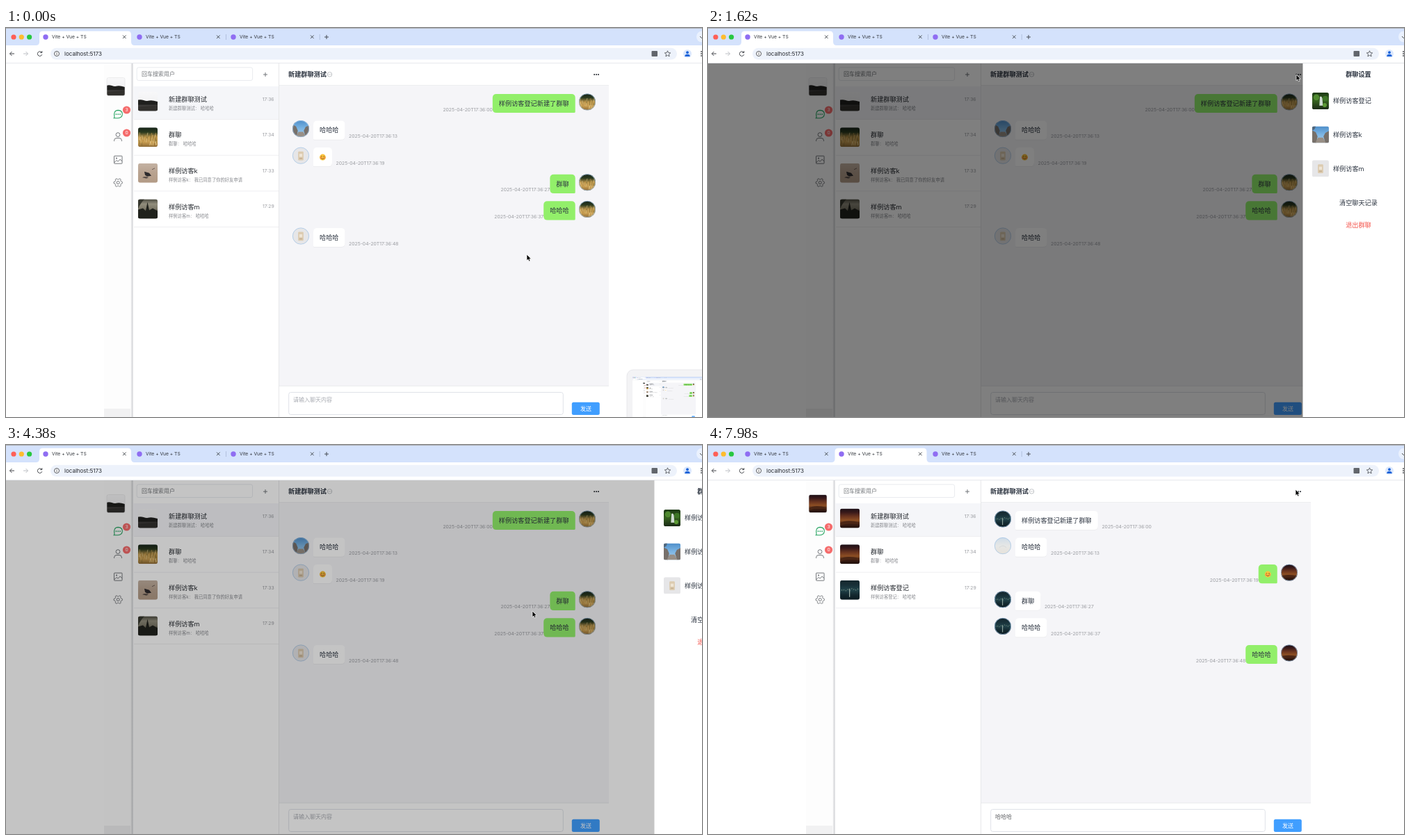
Write an HTML page that moves like this. It is 1001x560 px and loops after 8000 ms.

```html
<!DOCTYPE html>
<html lang="zh-CN">
<head>
<meta charset="utf-8">
<title>Chat</title>
<style>
html, body { margin: 0; width: 100%; height: 100%; overflow: hidden; background: #fff; }
svg { display: block; width: 100vw; height: 100vh; }
text { font-family: Inter, "Noto Sans CJK SC", "Noto Sans CJK", sans-serif; white-space: pre; }
</style>
</head>
<body>
<svg id="stage" viewBox="0 0 1001 560" xmlns="http://www.w3.org/2000/svg"></svg>
<script>
const LOOP = 8000;
const INK = '#2c3440', GREY = '#9a9ca1', GREEN = '#92ef6a', BLUE = '#409eff';
const GUEST = '样例访客登记', FRIEND = '样例访客k', PAL = '样例访客m', GROUP = '新建群聊测试';

// ---- drawing helpers; text is placed by its vertical centre
const T = (x, y, s, size, fill = INK, more = '') =>
  `<text x="${x}" y="${y + size * .37}" font-size="${size}" fill="${fill}" ${more}>${s}</text>`;
const R = (x, y, w, h, fill, more = '') =>
  `<rect x="${x}" y="${y}" width="${w}" height="${h}" fill="${fill}" ${more}/>`;
const C = (x, y, r, fill, more = '') => `<circle cx="${x}" cy="${y}" r="${r}" fill="${fill}" ${more}/>`;
const P = (d, fill, more = '') => `<path d="${d}" fill="${fill}" ${more}/>`;
const L = (d, color = '#4a4d52', w = 1, more = '') => P(d, 'none', `stroke="${color}" stroke-width="${w}" ${more}`);
const G = (id, body, more = '') => `<g id="${id}" ${more}>${body}</g>`;
const END = 'text-anchor="end"', MID = 'text-anchor="middle"';

let seed = 7;
const rnd = () => (seed = seed * 16807 % 2147483647) / 2147483647;
const many = (n, f) => Array.from({ length: n }, (_, i) => f(i)).join('');

// ---- avatars on a 28 x 28 square, each over a vertical gradient
const fade = (id, ...colors) => `<linearGradient id="${id}" x2="0" y2="1">` +
  colors.map((c, i) => `<stop offset="${i / (colors.length - 1)}" stop-color="${c}"/>`).join('') + '</linearGradient>' +
  R(0, 0, 28, 28, `url(#${id})`);

const art = {
  road: fade('fog', '#f8f8f9', '#ececee') + R(0, 15, 28, 13, '#3d3b39') +
    P('M0 12Q4 11 8 12.500T16 13T28 14.500V19H0Z', '#1f1f1d') + P('M0 28V22L28 20V28Z', '#32302d'),
  grass: fade('field0', '#16241a', '#2c3a1e', '#b9924a', '#c79c50', '#8d6a35') +
    many(46, () => {
      const x = rnd() * 28, y = 7 + rnd() * 14;
      return L(`M${x} ${y}l${rnd() * 3 - 1.5} 6`, ['#e3c27a', '#c9a04f', '#7d6a30', '#f0d9a0'][rnd() * 4 | 0], .6);
    }),
  sky: fade('noon', '#4f8fca', '#7db6e4', '#a8cdea') +
    P('M0 7L6 10L9 17L7 28H0ZM28 8L22 11L19 17L22 28H28Z', '#77706a') +
    P('M5 28L10 19H18L23 28Z', '#988f86') + P('M0 0H6L4 5L0 7Z', '#51677c'),
  bag: R(0, 0, 28, 28, '#e6e6e8') + R(9.5, 7, 9, 15, '#dccbb0', 'rx="1.5"') +
    R(11.5, 11, 5, 5, '#efe5d5') + R(11.5, 18, 5, 1.5, '#c0a98a'),
  beach: fade('sand', '#c4b2a3', '#b8a28f', '#b39b86') +
    P('M9 12l7 2 3 4-6 1-3-2z', '#2d2a2c') + P('M6 20.500q4-2.500 9 0l-3 1.500z', '#5a4e48') + L('M20 9l4-2', '#6d5d55', 1),
  castle: fade('dim', '#4b4b40', '#918d7c', '#7b7767', '#1d1f1a', '#171914') +
    P('M0 28V15L7 13L11 17L13.500 4L16 16L21 13L28 17V28Z', '#20221c') + P('M0 0H9Q3 6 0 14Z', '#35362d'),
  falls: fade('moss', '#1c3915', '#35611f', '#1b2a17') + C(7, 8, 5, '#4f8a2f') + C(22, 10, 4.5, '#3d7526') +
    P('M13 7Q16 5 17 10L18 22H12Z', '#d0ddd3') + C(21, 21, 3.500, '#5c9a35'),
  pale: fade('haze', '#cfdce8', '#e6e7e6', '#e6e2da') + L('M8 17Q14 11 20 17', '#d3d6d8'),
  dusk: fade('ember', '#1b0f16', '#3a1a1a', '#6a341f', '#8d4f24', '#3c1d12', '#1f100c') +
    P('M0 21Q9 15 28 20V23Q12 19 0 25Z', '#4b2615'),
  night: fade('bay', '#14262d', '#183038', '#21434a', '#13282f', '#0b1a20') +
    many(9, i => R(2 + i * 2.9, 11 + rnd() * 4, .8, 1.6, '#87998a')) + R(13, 12, 1.2, 12, '#9db0a8'),
};
const pic = (name, x, y, size, clip = 'square') =>
  `<g transform="translate(${x} ${y}) scale(${size / 28})"><use href="#${name}" clip-path="url(#${clip})"/>` +
  (clip === 'round' ? C(14, 14, 13.6, 'none', 'stroke="#9fc4e8" stroke-width=".8"') : '') + '</g>';

const emoji = (x, y) => C(x, y, 4.5, '#f9c23c') + C(x - 2.6, y + 1, 1.2, '#f58a4b') + C(x + 2.6, y + 1, 1.2, '#f58a4b') +
  L(`M${x - 2.7} ${y - .8}q.9-1.3 1.8 0M${x + .9} ${y - .8}q.9-1.3 1.8 0M${x - 1.9} ${y + 1.5}q1.9 2 3.8 0`, '#6b3a1c', .8);

// ---- page parts
const row = ([name, last, time, face], i) => {
  const y = 80 + i * 51.6;
  return (i ? '' : R(183.5, 84, 208.5, 47.5, '#f5f6f9')) + R(184, y + 51.2, 208, .8, '#ececee') +
    pic(face, 190, y + 11.6, 28) + T(234, y + 22.4, name, 9.17, '#22262c') +
    T(234, y + 35.4, `${name}： ${last}`, 6.3, '#85878c') + T(385.6, y + 22, time, 6.8, GREY, END);
};

const bubble = ([face, text, time, mine], i) => {
  const y = 108.5 + i * 38.6, w = 18 + (text ? text.length * 9.17 : 9);
  const x = mine ? 818.7 - w : 442, e = x + w, b = y + 13.6, t = y - 13.6;
  const [l, r] = mine ? [5.5, 1.5] : [1.5, 5.5];
  const shape = `M${x + 5.5} ${t}H${e - 5.5}q5.5 0 5.5 5.5V${b - r}q0 ${r} ${-r} ${r}H${x + l}q${-l} 0 ${-l} ${-l}V${t + 5.5}q0-5.5 5.5-5.5Z`;
  const stamp = '2025-04-20T17:36:' + time;
  return pic(face, mine ? 824 : 412, y - 14, 24, 'round') +
    (mine ? P(shape, GREEN) : P(shape, 'rgba(0,0,0,.05)', 'transform="translate(0 .7)"') + P(shape, '#fff')) +
    (text ? T(x + 9, y, text, 9.17) : emoji(x + w / 2, y + .4)) +
    (mine ? T(x, y + 8.5, stamp, 6.8, GREY, END) : T(e + 5.6, y + 8.5, stamp, 6.8, GREY));
};

const hello = GUEST + '新建了群聊', ha = '哈哈哈';
const views = [
  {
    me: 'road', draft: '',
    rows: [[GROUP, ha, '17:36', 'road'], ['群聊', ha, '17:34', 'grass'],
      [FRIEND, '我已同意了你的好友申请', '17:33', 'beach'], [PAL, ha, '17:29', 'castle']],
    talk: [['grass', hello, '00', 1], ['sky', ha, '13'], ['bag', '', '19'],
      ['grass', '群聊', '27', 1], ['grass', ha, '37', 1], ['bag', ha, '48']],
  },
  {
    me: 'dusk', draft: ha,
    rows: [[GROUP, ha, '17:36', 'dusk'], ['群聊', ha, '17:34', 'dusk'], [GUEST, ha, '17:29', 'night']],
    talk: [['night', hello, '00'], ['pale', ha, '13'], ['dusk', '', '19', 1],
      ['night', '群聊', '27'], ['night', ha, '37'], ['dusk', ha, '48', 1]],
  },
];
const view = (v, i) => G('view' + i,
  pic(v.me, 145, 71.5, 26) + R(145, 71.5, 26, 26, 'none', 'rx="2.5" stroke="#e2e2e4" stroke-width=".6"') +
  v.rows.map(row).join('') + G('talk' + i, v.talk.map(bubble).join('')) +
  (v.draft ? T(413, 535, v.draft, 8, '#606266') : T(413, 535, '请输入聊天内容', 8, '#a8abb2')));

const badge = (y, n) => C(173.5, y, 5.6, '#f56c6c') + T(173.5, y, n, 6.6, '#fff', MID);
const gear = L('M' + Array.from({ length: 72 }, (_, i) => {
  const a = i * Math.PI / 36, r = 5.4 + .8 * Math.tanh(3 * Math.cos(6 * a + Math.PI));
  return `${(161.2 + r * Math.sin(a)).toFixed(2)} ${(222.6 - r * Math.cos(a)).toFixed(2)}`;
}).join('L') + 'Z', '#66696e', .9) + C(161.2, 222.6, 2, 'none', 'stroke="#66696e" stroke-width=".9"');

const nav = R(141, 51, 39, 509, '#fdfdfd') + R(141, 548, 38, 12, '#f1f1f2') + R(179.5, 51, 4, 509, 'url(#edge)') +
  L('M156 128.5Q154 118.5 161.3 118.4Q167.3 118.8 167.3 124Q167 129.6 161 129.7H155.2Z', '#27a562', 1.1) +
  many(3, i => C(158.4 + i * 2.8, 124.2, .85, '#27a562')) + badge(118, '3') +
  C(161, 153.6, 2.9, 'none', 'stroke="#66696e" stroke-width=".9"') +
  L('M155.6 163v-1.5q.4-3 3.4-3h4q3 0 3.4 3v1.5', '#66696e', .9) + badge(151, '0') +
  R(155.5, 184.2, 11.5, 11, 'none', 'stroke="#66696e" stroke-width=".9" rx=".6"') + C(159, 187.5, 1, '#66696e') +
  L('M156 193.5l3.2-3 2 1.7 3-3.2 2.6 2.8', '#66696e', .9) + gear;

const tool = R(188.2, 56.8, 166.4, 18.7, '#fff', 'rx="2.5" stroke="#e0e3e9" stroke-width=".7"') +
  T(195, 66, '回车搜索用户', 8, '#73767a') + L('M370 67h6M373 64v6', '#66696e', .9);

const page = R(0, 50, 1001, 510, '#fff') + nav + tool + R(392.5, 51, 474.5, 509, '#f5f5f8') +
  G('head', R(393, 51, 474, 31.5, '#fff', 'id="headBg"') + R(393, 82.3, 474, .7, '#e9eaec', 'id="headLine"') +
    G('title', T(406, 67, GROUP, 9.17, INK, 'font-weight="600"') +
      C(465.5, 66.8, 3.3, '#fff', 'stroke="#b3b6ba" stroke-width=".8"') +
      many(3, i => C(463.8 + i * 1.7, 66.8, .5, '#9a9da2'))) +
    G('more', many(3, i => C(846.2 + i * 2.9, 67, 1, '#22262c')))) +
  R(393, 515, 474, 45, '#fff') + R(393, 514.8, 474, .8, '#e3e4e7') + R(392.2, 51, .8, 509, '#e3e4e7') +
  R(406.7, 524.5, 394.6, 32, '#fff', 'id="field" rx="3" stroke="#dcdfe6" stroke-width=".9"') +
  R(813.8, 538.8, 40, 18.3, BLUE, 'rx="2.5"') + T(834, 548, '发送', 8, '#fff', MID) + views.map(view).join('');

// ---- browser frame
const tabX = i => 48 + i * 135;
const chrome = R(0, 0, 1001, 26, '#d4e2fc') + R(0, 0, 1001, 1, '#aeb3ba') +
  ['#fe5f57', '#febc2e', '#28c840'].map((c, i) => C(11 + i * 11.3, 13, 3.6, c)).join('') +
  G('tab', P('M43 25q5 0 5-5V9.500q0-5 5-5H175q5 0 5 5V20q0 5 5 5Z', '#fff')) +
  R(0, 25, 1001, 25.3, '#fff') + R(64, 28.8, 901, 16.8, '#edf2fb', 'rx="8.4"') + R(0, 50, 1001, .7, '#dde0e5') +
  many(3, i => C(tabX(i) + 9, 13, 3.7, '#8f6df2') + T(tabX(i) + 18, 13, 'Vite + Vue + TS', 6.7, '#30343a') +
    L(`M${tabX(i) + 120} 10.500l4.600 4.600m0-4.600l-4.600 4.600`, '#3c4046', .9)) +
  R(316, 9, .8, 8, '#a9b9d6', 'id="gap"') + R(450.8, 9, .8, 8, '#a9b9d6') + L('M458 13h6M461 10v6', '#3c4046', .9) +
  C(1001, 12.500, 8, '#eaf1fe') + L('M998 12l2.500 2.500 2.500-2.500', '#30343a', .9) +
  L('M12 37H5.500m3-3l-3 3 3 3', '#44474c') + L('M25 37h6.500m-3-3l3 3-3 3', '#bcbfc4') +
  L('M51.200 35A3.300 3.300 0 1 0 51.800 38.200M51.800 33.200v2.400h-2.400', '#44474c') +
  C(73, 37, 3.5, '#fff', 'stroke="#44474c" stroke-width=".9"') + R(72.6, 36.4, .9, 2.4, '#44474c') + C(73, 35.3, .5, '#44474c') +
  T(84, 37, 'localhost:5173', 8, '#25282d') + R(928.5, 33, 8.5, 8, '#62666c', 'rx="1"') +
  L('M951.500 32.800l1.200 2.800 3 .3-2.300 2 .7 3-2.600-1.600-2.600 1.600.7-3-2.300-2 3-.3Z', '#44474c', .8) +
  C(980, 37, 6, '#dce8fd') + C(980, 35.2, 1.9, '#1a63d8') + P('M976.300 41q0-3.200 3.700-3.200t3.700 3.200Z', '#1a63d8') +
  many(3, i => C(1000, 34 + i * 3, .9, '#44474c'));

// ---- settings drawer, drawn from its own left edge
const member = (name, face, y) => pic(face, 13.5, y - 12, 24) + T(43.5, y, name, 9.17);
const drawer = R(0, 50.5, 170, 510, '#fff') + R(9.5, 238, 160, 27, '#f4f4f5', 'id="hot0" rx="4"') +
  R(9.5, 270, 160, 27, '#f4f4f5', 'id="hot1" rx="4"') + T(80, 67, '群聊设置', 9.17, INK, MID + ' font-weight="600"') +
  member(GUEST, 'falls', 105) + member(FRIEND, 'sky', 153.5) + member(PAL, 'bag', 202.2) +
  T(80, 252, '清空聊天记录', 9.17, INK, MID) + T(80, 284, '退出群聊', 9.17, '#f4544c', MID);

const thumb = R(893, 492, 140, 90, '#f3f3f5', 'rx="9" stroke="#e4e4e7" stroke-width=".8"') +
  '<g transform="translate(901 502) scale(.105)"><use href="#page"/><use href="#chrome"/></g>';

const arrow = P('M0 0V8.800L2 7L3.400 10L5 9.300L3.700 6.400H6.300Z', '#000', 'stroke="#fff" stroke-width=".7"');
const hand = P('M0 1Q.2 0 1.200.5L2.800 3.600Q3.600 2.800 4.200 3.600Q5.200 3 5.700 4Q6.800 3.700 7 5L6.800 8L5.800 10H2.300L-.8 6.800Q-.8 5.600.4 6L1.400 6.600Z',
  '#fff', 'stroke="#111" stroke-width=".9"');

const stage = document.getElementById('stage');
stage.innerHTML = `<defs><clipPath id="square"><rect width="28" height="28" rx="3"/></clipPath>
  <clipPath id="round"><circle cx="14" cy="14" r="14"/></clipPath>
  <linearGradient id="edge"><stop stop-color="#f4f4f5"/><stop offset=".6" stop-color="#d5d6d9"/><stop offset="1" stop-color="#fff"/></linearGradient>
  ${Object.entries(art).map(([k, v]) => G(k, v)).join('')}</defs>` +
  G('page', page) + R(0, 50.5, 1001, 510, '#000', 'id="shade"') + G('drawer', drawer) +
  G('chrome', chrome) + G('thumb', thumb) + G('arrow', arrow) + G('hand', hand);

// ---- motion
const $ = id => document.getElementById(id);
const set = (id, k, v) => $(id).setAttribute(k, v);
const show = (id, on) => set(id, 'display', on ? 'inline' : 'none');
const move = (id, x, y = 0) => set(id, 'transform', `translate(${x} ${y})`);
const part = (t, a, b) => Math.min(1, Math.max(0, (t - a) / (b - a)));
const smooth = u => u * u * (3 - 2 * u);

// CSS "ease" curve
function ease(x) {
  let a = 0, b = 1;
  for (let i = 0; i < 20; i++) {
    const s = (a + b) / 2;
    if (.75 * s * (1 - s) * (1 - s) + .75 * s * s * (1 - s) + s ** 3 < x) a = s; else b = s;
  }
  return .3 * a * (1 - a) * (1 - a) + 3 * a * a * (1 - a) + a ** 3;
}

const path = [[0, 749, 326], [450, 749, 326], [1220, 846, 67], [2220, 846, 67], [2990, 938, 249], [3170, 938, 249],
  [3475, 924, 289], [3620, 924, 289], [3990, 757, 239], [4960, 757, 239], [4980, 746, 238], [5700, 251, 12],
  [5880, 251, 12], [6590, 280.5, 93], [7580, 280.5, 93], [7975, 845, 64]];
function pointer(t) {
  let i = path.length - 1;
  while (path[i][0] > t) i--;
  const a = path[i], b = path[i + 1] || a;
  const u = a === b ? 0 : smooth(part(t, a[0], b[0]));
  return [a[1] + (b[1] - a[1]) * u, a[2] + (b[2] - a[2]) * u];
}

function draw(t) {
  const second = t >= 5850, bare = second && t < 6780;
  const [x, y] = pointer(t);

  show('view0', !second);
  show('view1', second);
  move('tab', second ? 134.5 : 0);
  show('gap', !second);

  show('title', !bare);
  set('headBg', 'height', bare ? 27 : 31.5);
  set('headLine', 'y', bare ? 77.8 : 82.3);
  move('more', 0, bare ? -2.5 : 0);
  move('talk1', 0, bare ? -4.5 : 0);
  set('field', 'stroke', bare ? BLUE : '#dcdfe6');

  const leave = ease(part(t, 4300, 4560));
  const open = ease(part(t, 1400, 1660)) - leave;
  const inside = t >= 1405 && t < 4560;
  show('drawer', inside);
  move('drawer', 1001 - 147.5 * open);
  show('shade', inside);
  set('shade', 'opacity', .5 * (1 - leave));

  const over = (a, b) => inside && x > 863 && y >= a && y <= b;
  const hot = [over(238, 265), over(270, 297)];
  hot.forEach((on, i) => show('hot' + i, on));

  const out = part(t, 450, 900);
  show('thumb', out < 1);
  move('thumb', 120 * out * out);

  const link = hot[0] || hot[1] || (second && y > 84 && x < 392);
  show('hand', link);
  show('arrow', !link);
  move(link ? 'hand' : 'arrow', x, y);
}

function tick(now) {
  draw(now % LOOP);
  requestAnimationFrame(tick);
}
draw(0);
requestAnimationFrame(tick);
</script>
</body>
</html>
```
